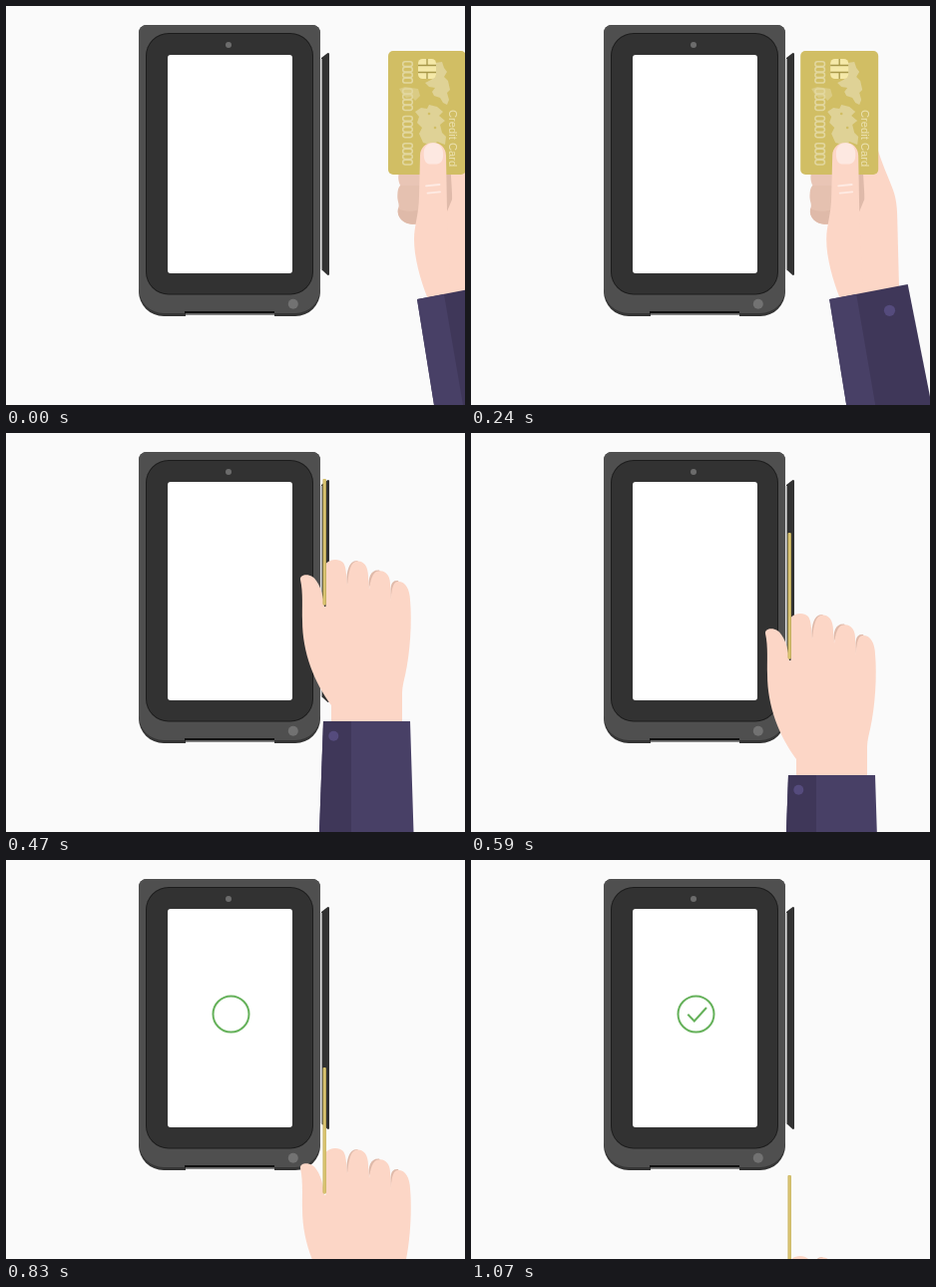
These frames come from a looping animation (460 by 400 pixels, 1240 ms). An HTML page with a canvas:

```html
<!DOCTYPE html>
<html lang="en">
<head>
<meta charset="utf-8">
<title>Card payment</title>
<style>
  html, body { margin: 0; width: 100%; height: 100%; overflow: hidden; background: #fafafa; }
  canvas { display: block; width: 460px; height: 400px; }
</style>
</head>
<body>
<canvas id="stage" width="460" height="400"></canvas>
<script>
const ctx = document.getElementById('stage').getContext('2d');

const LOOP = 1240, STEP = 30;
const SWIPE_START = 470, SWIPE_END = 1070;
const RING = [680, 830], TICK = [830, 980];

const SKIN = '#fcd6c6', SHADE = '#dfbaaa', GOLD = '#d1be64', PALE = '#e2d79f';
const SLEEVE = '#484066', SLEEVE_DARK = '#3f3759', BUTTON = '#554b7d', GREEN = '#65b15a';

const clamp = v => Math.min(1, Math.max(0, v));
const progress = (t, [from, to]) => clamp((t - from) / (to - from));

function fill(d, color) {
  ctx.fillStyle = color;
  ctx.fill(new Path2D(d));
}

function stroke(d, color, width) {
  ctx.strokeStyle = color;
  ctx.lineWidth = width;
  ctx.stroke(new Path2D(d));
}

function box(x, y, w, h, r, color) {
  ctx.beginPath();
  ctx.roundRect(x, y, w, h, r);
  ctx.fillStyle = color;
  ctx.fill();
}

function dot(x, y, r, color) {
  ctx.beginPath();
  ctx.arc(x, y, r, 0, Math.PI * 2);
  ctx.fillStyle = color;
  ctx.fill();
}

function at(x, y, draw) {
  ctx.save();
  ctx.translate(x, y);
  draw();
  ctx.restore();
}

function drawTerminal() {
  fill('M316 52 L322.5 47 L324 47.5 V269.5 L322.5 270 L316 264Z', '#323232');
  box(315.6, 53, 1.2, 211, 0, '#b4b4b4');

  box(133, 19, 182, 292, [8, 8, 25, 25], '#343434');
  box(133, 19, 182, 289, [8, 8, 25, 25], '#4f4f4f');
  box(180, 309.5, 89, 2, 0, '#fafafa');
  box(179, 306, 90, 2.2, 0, '#111');
  box(180, 308.2, 89, 1.3, 0, '#777');

  box(140, 27, 168, 262.5, 23, '#1c1c1c');
  box(141, 28, 166, 260.5, 22, '#323232');
  box(162, 49, 125, 219, 3, '#fff');
  dot(223, 39, 3, '#6c6c6c');
  dot(287.8, 298.7, 5, '#727272');
}

function drawApproval(t) {
  const ring = progress(t, RING), tick = progress(t, TICK);
  ctx.strokeStyle = GREEN;
  ctx.lineWidth = 2;
  if (ring > 0) {
    ctx.beginPath();
    ctx.arc(225.5, 154.5, 18, -Math.PI / 2, -Math.PI / 2 + ring * Math.PI * 2);
    ctx.stroke();
  }
  if (tick > 0) {
    const length = 28.5;
    ctx.setLineDash([tick * length, length]);
    stroke('M217.3 154.8 L223.8 161.5 L236 148', GREEN, 2);
    ctx.setLineDash([]);
  }
}

function drawMap() {
  fill('M364 57 L371 56 L373 62 L376 66 L373 71 L377 75 L379 84 L376 87 L378 94 L376 99 ' +
       'L372 97 L369 92 L363 90 L361 86 L364 82 L358 81 L354 77 L360 74 L365 70 L362 64Z', '#dfd296');
  fill('M328 83 L334 81 L347 83 L349 90 L344 95 L341 91 L335 92 L331 88Z', '#dacb84');
  fill('M344 106 L350 102 L356 103 L358 99 L366 101 L372 106 L368 110 L374 115 L369 119 ' +
       'L371 127 L375 131 L374 139 L366 136 L362 140 L352 137 L348 128 L351 122 L346 117 L348 111Z', '#dfd296');
  dot(358, 108, 1.3, GOLD);
  dot(364, 122, 1.3, GOLD);
}

function drawCard() {
  box(317, 45, 78, 124, 5, GOLD);
  drawMap();

  // Embossed digits, four groups of four
  ctx.strokeStyle = PALE;
  ctx.lineWidth = 1.5;
  for (let group = 0; group < 4; group++) {
    for (let i = 0; i < 4; i++) {
      ctx.beginPath();
      ctx.roundRect(331.7, 55.8 + group * 27.3 + i * 5.5, 9.6, 4.8, 2.4);
      ctx.stroke();
    }
  }

  box(347, 53, 18, 20, 4.5, '#f5e9a8');
  stroke('M347 59.5 H365 M347 66.5 H365 M356 53 V59.5 M356 66.5 V73', '#a79849', 1.3);

  ctx.save();
  ctx.translate(378, 104);
  ctx.rotate(Math.PI / 2);
  ctx.font = '11.2px "Liberation Sans", Arial, sans-serif';
  ctx.fillStyle = '#ebe1b1';
  ctx.fillText('Credit Card', 0, 0);
  ctx.restore();
}

function drawHolder() {
  fill('M328 166 H354 V186 H339 C331 186 325 177 328 166Z', '#e9c5b5');
  fill('M329 180 H356 V219 H343 C332 219 325 211 327 203 C329 199 326 196 326.3 190 C326.5 185 327 182 329 180Z', '#e5c1b0');
  fill('M327 203 C332 206 341 207 349 204 L347 217 C337 221 325 215 327 203Z', '#dfbaa9');

  fill('M394 142 C398 157 405 171 410 185 C413 193 414 204 414 212 L416 290 L357 298 L362 200 L372 160Z', SKIN);
  fill('M366 160 H379.5 C380 175 381.5 189 381 194 L376 206 H366Z', '#dfbaaa');

  drawCard();

  fill('M349 150 C349 132.5 375 132.5 375 150 L376 206 L380 294 L357 294 ' +
       'C349 274 343 252 343 234 C343 220 348 208 348 190Z', SKIN);
  fill('M352.7 147 C353 134 371.5 134 372 147 C372.5 153 371 158 366 158.5 H358 C354 158 352.5 153 352.7 147Z', '#fde8e1');
  ctx.lineCap = 'round';
  stroke('M355 180.3 L368.5 179 M356.5 187.6 L369 186.3', '#feebe4', 1.8);
  ctx.lineCap = 'butt';

  fill('M346 294 L424.5 279 L448.5 400 H363Z', SLEEVE_DARK);
  fill('M346 294 L373 289 L392 400 H363Z', SLEEVE);
  dot(406.3, 305.3, 5.6, BUTTON);
}

function drawSwiper() {
  // Darker sides of the fingers
  fill('M341.5 153 C341 140 343 128 352 128 L358 134 L345 146Z', SHADE);
  fill('M363.5 156 C363 145 365 137 374 137.5 L378 143 L366 150Z', SHADE);
  fill('M385.5 168 C385 155 385 147 393 148 L396 154 L387 160Z', SHADE);

  fill('M295 147 C294.5 142 302 141 307 144 C313 148 318 160 319 174 L320.5 174 V131 ' +
       'C325 126 334 126 338 130 C341 134 341 142 342 153 C343 144 344 131 350 129 ' +
       'C357 127 363 132 363 144 L364 157 C365 149 367 139 373 138.5 C380 137 385 143 385 151 ' +
       'L386 169 C386 160 387 150 392 149 C400 148 404.5 156 405 167 C407 190 405 221 400 243 ' +
       'C398 251 397 256 397 262 V291 H326 V273 C309 250 297 220 297 188 C296.5 176 298 160 295 147Z', SKIN);

  box(317.5, 46, 3.4, 126.5, [1, 1, 1.5, 1.5], '#c6b05a');
  box(318.3, 46, 1.8, 126.5, 1, '#dac572');

  fill('M318 289 H405 L408.5 400 H314Z', SLEEVE);
  fill('M318 289 H346 V400 H314Z', SLEEVE_DARK);
  dot(328.3, 303.8, 5, BUTTON);
}

// The motion advances in 30 ms steps
const steps = t => Math.floor((t + 0.01) / STEP);

function render(t) {
  ctx.fillStyle = '#fafafa';
  ctx.fillRect(0, 0, 460, 400);
  drawTerminal();
  if (t < SWIPE_START) {
    at(66 - 6.6 * Math.min(10, steps(t)), 0, drawHolder);
    return;
  }
  const n = Math.min(20, steps(t - SWIPE_START));
  drawApproval(Math.min(SWIPE_END, SWIPE_START + n * STEP));
  at(0, n * 13.5, drawSwiper);
}

const start = performance.now();
function tick() {
  render((performance.now() - start) % LOOP);
  requestAnimationFrame(tick);
}
tick();
</script>
</body>
</html>
```
